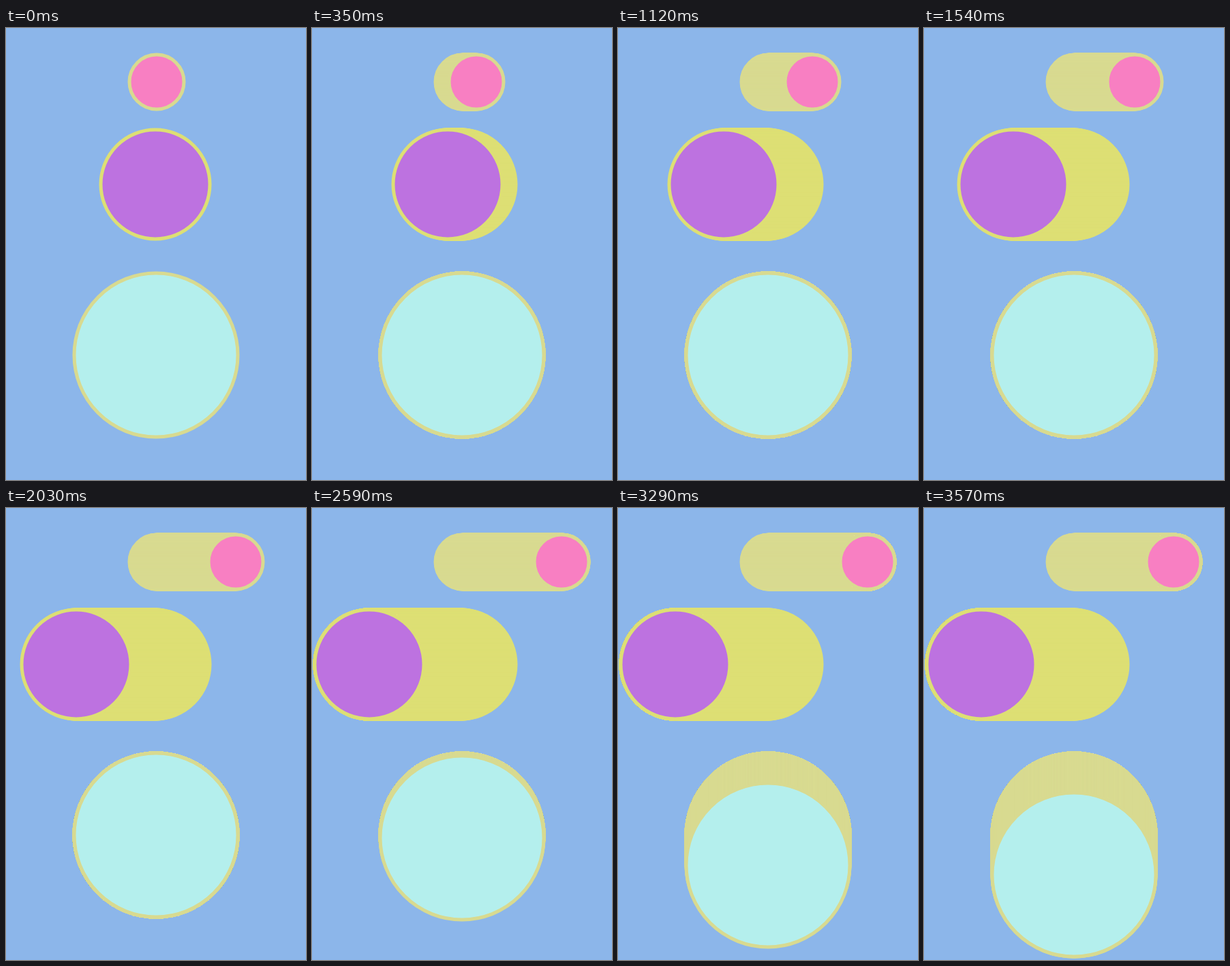
An HTML page with a canvas for the animation above (4960 ms loop, 440 px wide and 662 px high).

```html
<!DOCTYPE html>
<html lang="en">
<head>
<meta charset="utf-8">
<title>Sliding circles</title>
<style>
  html, body { margin: 0; width: 100%; height: 100%; overflow: hidden; background: #8cb6ea; }
  canvas { display: block; width: 440px; height: 662px; }
</style>
</head>
<body>
<canvas id="stage" width="440" height="662"></canvas>
<script>
const ctx = document.getElementById('stage').getContext('2d');
const LOOP = 4960, TICK = 70, LAST = 51, SPEED = 4;
const clamp = (v, lo, hi) => Math.min(hi, Math.max(lo, v));

function disc(x, y, r, fill, stroke) {
  ctx.beginPath();
  ctx.arc(x, y, r, 0, Math.PI * 2);
  ctx.fillStyle = fill;
  ctx.fill();
  ctx.strokeStyle = stroke;
  ctx.stroke();
}

// The discs are never erased, so their outlines pile up into trails.
function draw(step) {
  ctx.fillStyle = '#8cb6ea';
  ctx.fillRect(0, 0, 440, 662);
  ctx.lineWidth = 5;
  for (let k = 0; k <= step * SPEED; k++) {
    disc(221 + Math.min(k, 145), 79, 40, '#f87fc2', '#d8da90');
    disc(219 - Math.min(k, 135), 229, 80, '#bd72e0', '#dddf74');
    disc(220, 479 + clamp(k - 144, 0, 58), 120, '#b4efed', '#d8da90');
  }
}

const start = performance.now();
let shown = -1;

function frame() {
  const t = (performance.now() - start) % LOOP;
  const step = Math.min(LAST, Math.floor(t / TICK));
  if (step !== shown) {
    draw(step);
    shown = step;
  }
  requestAnimationFrame(frame);
}
frame();
</script>
</body>
</html>
```
